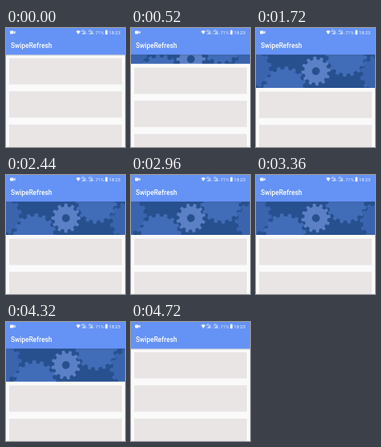
An HTML page for the animation above (5.44 s loop, 149 by 149 pixels).

```html
<!DOCTYPE html>
<html lang="en">
<head>
<meta charset="utf-8">
<title>SwipeRefresh</title>
<style>
  html, body { margin: 0; height: 100%; overflow: hidden; background: #fafafa; }
  svg { display: block; width: 100vw; height: 100vh; }
  text { font-family: Roboto, sans-serif; fill: #fff; }
</style>
</head>
<body>
<svg viewBox="0 0 149 149">
  <defs>
    <linearGradient id="shade" x2="0" y2="1">
      <stop stop-color="#123" stop-opacity=".25"/>
      <stop offset="1" stop-color="#123" stop-opacity="0"/>
    </linearGradient>
  </defs>
  <rect width="149" height="149" fill="#fafafa"/>
  <rect y="33" width="149" height="50" fill="#27508f"/>
  <g id="gears"></g>
  <g id="list">
    <rect y="33" width="149" height="130" fill="#fafafa"/>
    <g fill="#e9e5e5">
      <rect x="4" y="37.7" width="141" height="33"/>
      <rect x="4" y="79.3" width="141" height="33"/>
      <rect x="4" y="120.9" width="141" height="33"/>
    </g>
  </g>
  <rect y="33" width="149" height="2.5" fill="url(#shade)"/>
  <rect width="149" height="33.4" fill="#6592f5"/>
  <text x="6" y="25.3" font-size="8.4" font-weight="500">SwipeRefresh</text>
  <g fill="#fff" opacity=".9">
    <rect x="5" y="3.4" width="4.6" height="4" rx=".7"/>
    <path d="M9.2 5.4 11.6 3.6V7.2Z"/>
    <path d="M87.8 4.2Q90.5 1.8 93.2 4.2L90.5 8Z"/>
    <path d="M99.6 8V3L94.6 8ZM108.6 8V3L103.6 8Z" opacity=".6"/>
    <rect x="124.2" y="3" width="3" height="5.2" rx=".4"/>
    <rect x="125" y="2.4" width="1.4" height="1"/>
  </g>
  <g font-size="3.6" opacity=".9">
    <text x="94" y="5">4G</text>
    <text x="103" y="5">4G</text>
    <text x="99.6" y="8">↑↓</text>
    <text x="108" y="8">↑↓</text>
  </g>
  <g font-size="5.7" opacity=".9">
    <text x="112" y="7.6">71%</text>
    <text x="129" y="7.6">18:23</text>
  </g>
</svg>
<script>
const LOOP = 5440, REST = 42, PEAK = 48;
const $ = id => document.getElementById(id);

// x, y from the panel centre, outer radius, teeth, colour, turn ratio, first angle
const specs = [
  [-5, -3, 25, 14, '#3a64ae', 0.8, 6],
  [155, 4, 25, 14, '#3a64ae', 0.8, 6],
  [36, 21, 27, 16, '#416cb8', -0.7, 0],
  [113, -19, 26, 16, '#416cb8', -0.7, 0],
  [75, 0, 18.3, 12, '#5b80c6', 1, 0]
];

function gearPath(r, teeth) {
  const inner = r - 3.8, step = 2 * Math.PI / teeth;
  const corners = [[-.3, inner], [-.18, r], [.18, r], [.3, inner]];
  const points = [];
  for (let i = 0; i < teeth; i++)
    for (const [shift, radius] of corners) {
      const a = (i + shift) * step;
      points.push([radius * Math.sin(a), -radius * Math.cos(a)].map(v => v.toFixed(2)));
    }
  return 'M' + points.join('L') + 'Z';
}

$('gears').innerHTML = specs.map(([, , r, teeth, colour], i) =>
  `<g><path d="${gearPath(r, teeth)}" fill="${colour}"/>` +
  (i === 4 ? '<circle r="4.9" fill="#27508f"/>' : '') +
  '</g>').join('');
const gears = [...$('gears').children];

const smooth = p => p * p * (3 - 2 * p);
const part = (t, from, to) => smooth(Math.min(1, Math.max(0, (t - from) / (to - from))));

function pull(t) {
  return PEAK * part(t, 340, 900) - (PEAK - REST) * part(t, 1180, 1440) - REST * part(t, 4300, 4720);
}

function draw(now) {
  const t = now % LOOP, offset = pull(t);
  const angle = t < 1440 ? (offset - REST) * 4 : (t - 1440) * 0.09;
  $('list').setAttribute('transform', `translate(0 ${offset})`);
  gears.forEach((gear, i) => {
    const [x, y, , , , ratio, first] = specs[i];
    gear.setAttribute('transform',
      `translate(${x} ${33 + offset / 2 + y}) rotate(${first + angle * ratio})`);
  });
  requestAnimationFrame(() => draw(performance.now()));
}
draw(performance.now());
</script>
</body>
</html>
```
